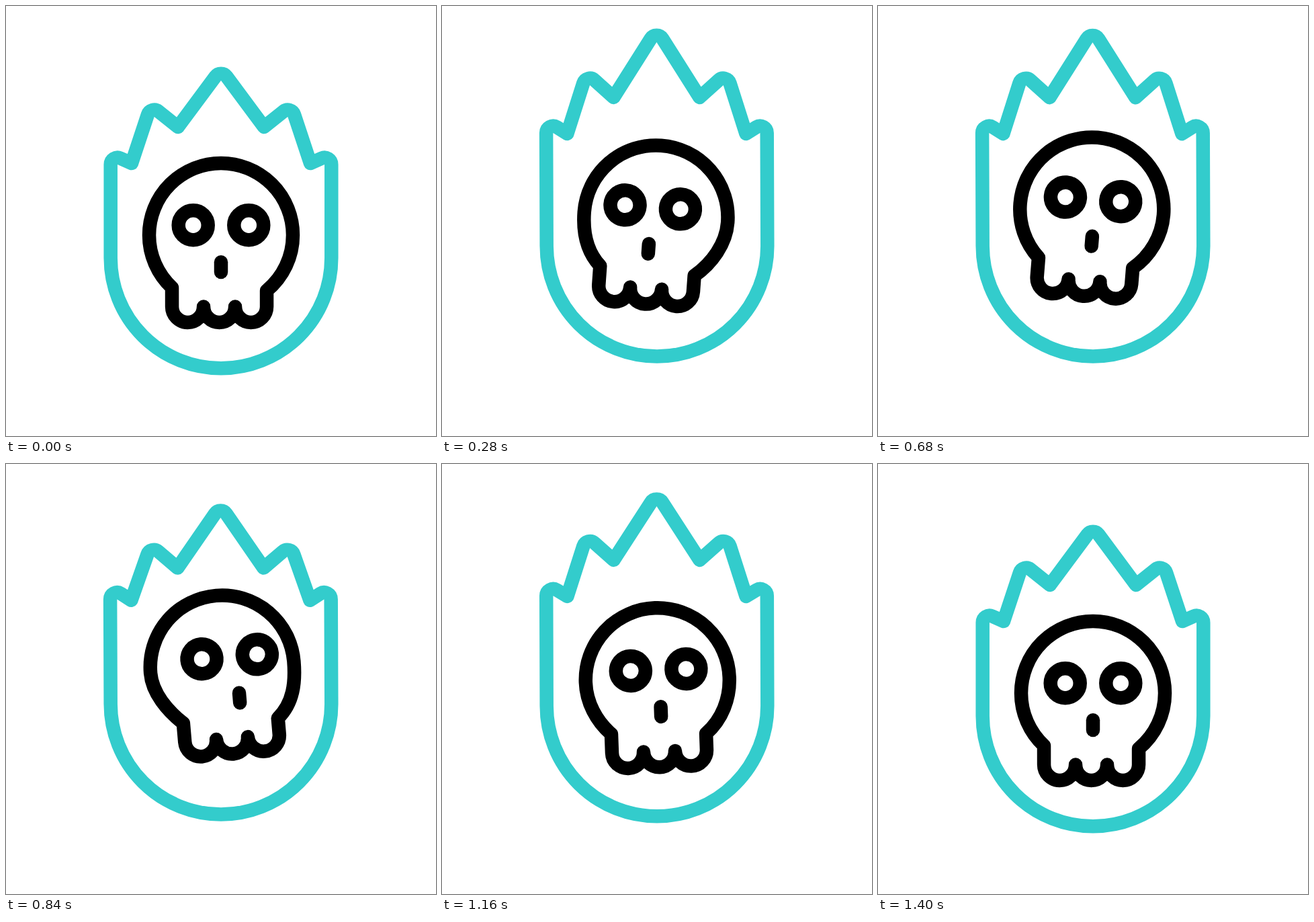
An HTML page that plays this animation: 640 px wide and 640 px high, repeating every 1520 ms.

```html
<!DOCTYPE html>
<html lang="en">
<head>
<meta charset="utf-8">
<title>Burning skull</title>
<style>
  html, body { margin: 0; width: 100%; height: 100%; overflow: hidden; background: #fff; }
  svg { display: block; width: 100%; height: 100%; }
  svg * { fill: none; stroke-width: 20.5; stroke-linecap: round; stroke-linejoin: round; }
</style>
</head>
<body>
<svg viewBox="0 0 640 640">
  <path id="flame" stroke="#33cccc"/>
  <g id="skull" stroke="#000">
    <path id="head"/>
    <g id="eyes">
      <circle cx="278.7" cy="326.3" r="22"/>
      <circle cx="361.3" cy="326.3" r="22"/>
    </g>
    <path id="nose" d="M320 381.2V396"/>
  </g>
</svg>
<script>
const LOOP = 1520, STEP = 40;
const MID = 320, TIP_R = 10.3, BODY_R = 164.3;
const HEAD_Y = 341, HEAD_R = 107, TEETH_Y = 447.5, TOOTH_R = 23.5;
const $ = id => document.getElementById(id);
const flame = $('flame'), skull = $('skull'), head = $('head'), eyes = $('eyes'), nose = $('nose');

// Smooth step from 0 at time a to 1 at time b
function ease(t, a, b) {
  const x = Math.min(1, Math.max(0, (t - a) / (b - a)));
  return x * x * (3 - 2 * x);
}

const rise = t => ease(t, 60, 280) - ease(t, 1080, 1400);
const hop = t => 20.5 * (ease(t, 120, 480) - ease(t, 840, 1300));
const tilt = t => 10 * ease(t, 120, 480) - 17 * ease(t, 530, 930) + 7 * ease(t, 930, 1290);

// Two flickers of the flame between rising and falling
function flicker(t) {
  const x = (t - 280) / 388;
  return x > 0 && x < 2 ? Math.sin(Math.PI * x) ** 2 : 0;
}

// Sideways drift of a face part: left, right, back
const sway = (t, left, right) =>
  (left + right) * ease(t, 480, 880) - left * ease(t, 80, 480) - right * ease(t, 940, 1230);

// Left half of the crown: rounded tips (centres) and sharp valleys in turn
const HALF = [[166, 236], [187, 234], [220.7, 165], [256, 180], [MID, 111]];
const CROWN = [...HALF, ...HALF.slice(0, -1).reverse().map(([x, y]) => [2 * MID - x, y])];

// Point where a line between p and the rounded tip c touches the tip
function touch(c, p, leaving) {
  const dx = p[0] - c[0], dy = p[1] - c[1];
  const beta = Math.asin(TIP_R / Math.hypot(dx, dy));
  const u = (leaving ? Math.atan2(dy, dx) + beta : Math.atan2(-dy, -dx) - beta) - Math.PI / 2;
  return [c[0] + TIP_R * Math.cos(u), c[1] + TIP_R * Math.sin(u)];
}

function flamePath(up, sag) {
  const base = 375 - 17.8 * up;
  const left = [MID - BODY_R, base], right = [MID + BODY_R, base];
  const pts = CROWN.map(([x, y], i) => {
    const reach = x === MID ? 57 : i % 2 ? 44 : 47;
    const drop = 13 + 0.11 * (236 - y);
    return [x - 0.6 * up, y - reach * up + drop * sag];
  });
  let d = `M${left}`;
  pts.forEach((p, i) => {
    if (i % 2) { d += `L${p}`; return; }
    const a = touch(p, pts[i - 1] || left, false);
    const b = touch(p, pts[i + 1] || right, true);
    d += `L${a}A${TIP_R} ${TIP_R} 0 0 1 ${b}`;
  });
  return d + `L${right}A${BODY_R} ${BODY_R} 0 0 1 ${left}Z`;
}

// Arc from the widest point of the head down to the jaw, whose end shifts with it
function cheek(side, degrees, shift) {
  const a = degrees * Math.PI / 180, k = HEAD_R * 4 / 3 * Math.tan(a / 4);
  const x = MID + side * HEAD_R * Math.cos(a) + shift, y = HEAD_Y + HEAD_R * Math.sin(a);
  return [
    [MID + side * HEAD_R, HEAD_Y],
    [MID + side * HEAD_R, HEAD_Y + k],
    [x + side * k * Math.sin(a), y - k * Math.cos(a)],
    [x, y]
  ];
}

function headPath(shift) {
  const r = cheek(1, 50.5, shift), l = cheek(-1, 47, shift);
  let d = `M${l[0]}A${HEAD_R} ${HEAD_R} 0 0 1 ${r[0]}C${r.slice(1).join(' ')}V${TEETH_Y}`;
  for (let i = 1; i <= 3; i++) {
    d += `A${TOOTH_R} ${TOOTH_R} 0 0 1 ${r[3][0] - 2 * TOOTH_R * i} ${TEETH_Y}`;
  }
  return d + `L${l[3]}C${l[2]} ${l[1]} ${l[0]}Z`;
}

function draw(time) {
  const t = Math.floor(time % LOOP / STEP) * STEP;
  const up = rise(t);
  flame.setAttribute('d', flamePath(up, flicker(t)));
  skull.setAttribute('transform', `translate(0 ${-18 * up - hop(t)}) rotate(${tilt(t)} ${MID} ${MID})`);
  head.setAttribute('d', headPath(sway(t, 9.4, 8.8)));
  eyes.setAttribute('transform', `translate(${sway(t, 11.7, 12.9)} 0)`);
  nose.setAttribute('transform', `translate(${sway(t, 15.4, 23)} 0)`);
}

const start = performance.now();
function loop() {
  draw(performance.now() - start);
  requestAnimationFrame(loop);
}
loop();
</script>
</body>
</html>
```
